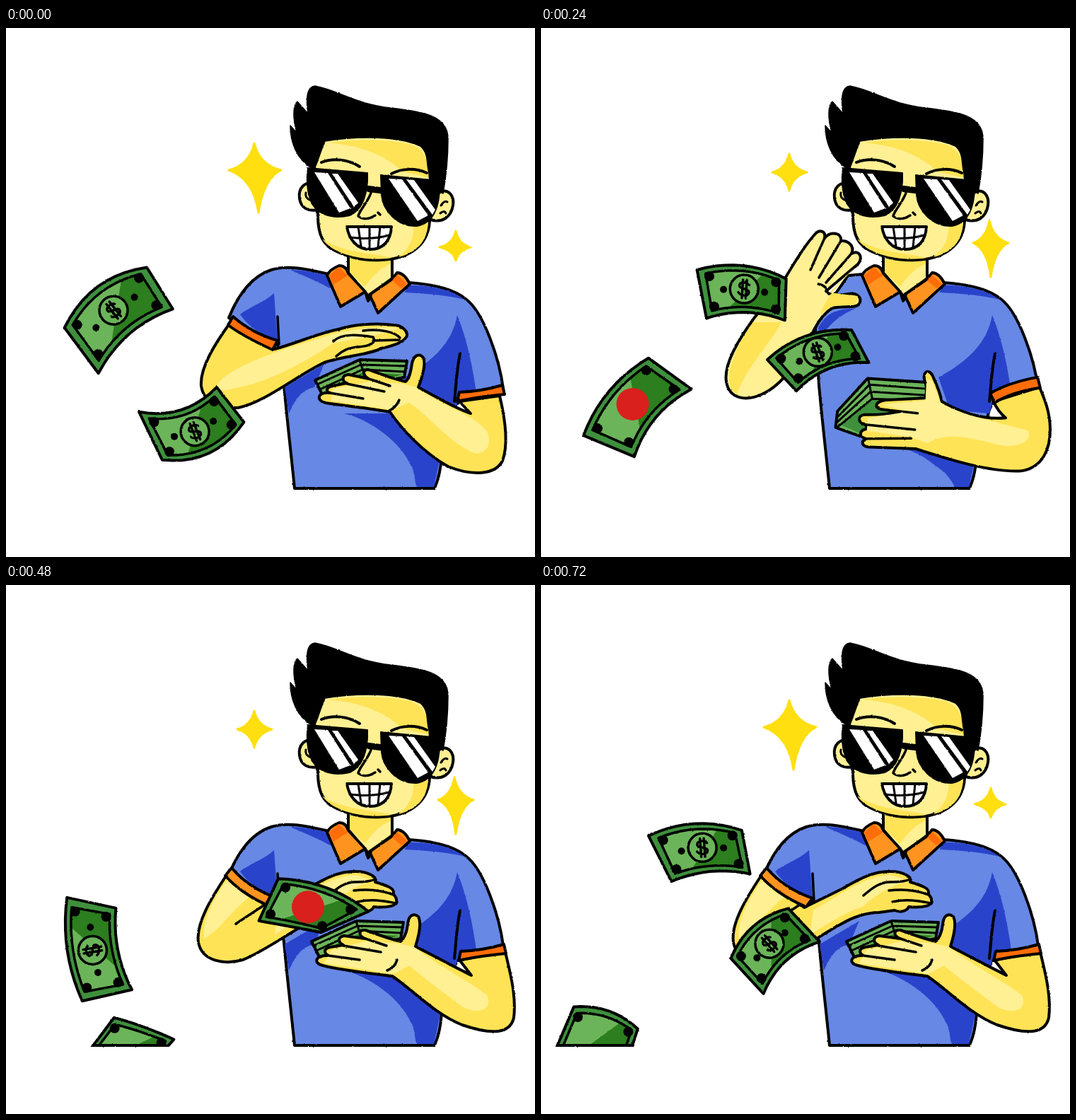
Write an HTML page that moves like this. It is 748x748 px and loops after 800 ms.

```html
<!DOCTYPE html>
<html lang="en">
<head>
<meta charset="utf-8">
<title>Raining money</title>
<style>
  html, body { margin: 0; width: 100%; height: 100%; overflow: hidden; background: #fff; }
  svg { display: block; width: 100vw; height: 100vh; }
  .art { stroke: #000; stroke-linecap: round; stroke-linejoin: round; }
  .pose { opacity: 0; animation: pose 400ms step-end infinite; animation-delay: calc(var(--i) * 80ms - 400ms); }
  .star { stroke: #ffdf10; stroke-width: 3; fill: #ffdf10; }
  .one { animation: twinkle 800ms step-end infinite; }
  .two { opacity: 0; animation: twinkle-off 800ms step-end infinite; }
  @keyframes pose { 0% { opacity: 1; } 20%, 100% { opacity: 0; } }
  @keyframes twinkle { 0%, 40%, 80%, 100% { opacity: 1; } 20%, 60% { opacity: 0; } }
  @keyframes twinkle-off { 0%, 40%, 80%, 100% { opacity: 0; } 20%, 60% { opacity: 1; } }
</style>
</head>
<body>
<svg viewBox="0 0 748 748" xmlns="http://www.w3.org/2000/svg">
  <defs>
    <filter id="ink" filterUnits="userSpaceOnUse" x="0" y="0" width="748" height="748" color-interpolation-filters="sRGB">
      <feTurbulence type="fractalNoise" baseFrequency=".3" numOctaves="2" seed="4"/>
      <feDisplacementMap in="SourceGraphic" scale="2" xChannelSelector="R" yChannelSelector="G"/>
    </filter>
    <clipPath id="floor"><rect width="748" height="653"/></clipPath>
  </defs>
  <g id="art" class="art" filter="url(#ink)"></g>
</svg>
<script>
const SKIN = '#fff093', TAN = '#fee356', BLUE = '#6788e4', NAVY = '#2944cb',
  ORANGE = '#ff931f', RUST = '#ff6d08', LEAF = '#6cb45a', GREEN = '#3f903d', MOSS = '#2c7e1e', RED = '#d9201c';

const ink = (d, fill = 'none', w = 4) => `<path d="${d}" fill="${fill}" stroke-width="${w}"/>`;
const tint = (d, fill) => `<path d="${d}" fill="${fill}" stroke="none"/>`;
const dot = (x, y, r, fill = '#000', w = 0) => `<circle cx="${x}" cy="${y}" r="${r}" fill="${fill}" stroke-width="${w}"/>`;
const group = (body, attrs = '') => `<g ${attrs}>${body}</g>`;

// Four-pointed star from its centre and the reach of each tip; lean shifts the lower tip.
function star(x, y, up, right, down, left, lean = 0) {
  const k = 0.2, foot = x + lean;
  return `<path class="star" d="M${x} ${y - up}Q${x + right * k} ${y - up * k} ${x + right} ${y}` +
    `Q${foot + right * k} ${y + down * k} ${foot} ${y + down}Q${foot - left * k} ${y + down * k} ${x - left} ${y}` +
    `Q${x - left * k} ${y - up * k} ${x} ${y - up}Z"/>`;
}

const mix = (a, b, t) => a.map((v, i) => v + (b[i] - v) * t);

// Straight edge a-b bowed sideways by bow pixels at its middle.
function edge(a, b, bow) {
  const dx = b[0] - a[0], dy = b[1] - a[1], len = Math.hypot(dx, dy);
  return t => {
    const k = bow * 4 * t * (1 - t) / len, q = mix(a, b, t);
    return [q[0] + dy * k, q[1] - dx * k];
  };
}

// Banknote through corners TL, TR, BR, BL; kind is 'cash', 'badge' or 'plain'.
function bill(tl, tr, br, bl, bowTop, bowBottom, kind = 'cash') {
  const top = edge(tl, tr, bowTop), bottom = edge(bl, br, bowBottom);
  const at = (u, v) => mix(top(u), bottom(u), v);
  const row = (u0, u1, v) => Array.from({ length: 11 }, (_, i) => at(u0 + (u1 - u0) * i / 10, v));
  const shape = (...rows) => 'M' + rows.flat().map(q => q.map(n => n.toFixed(1)).join(' ')).join('L') + 'Z';
  const frame = shape(row(.09, .91, .13), row(.91, .09, .87));
  let out = ink(shape(row(.01, .99, .02), row(.99, .01, .98)), GREEN) + tint(frame, LEAF) +
    tint(shape(row(.72, .91, .13), row(.91, .3, .87)), MOSS) + ink(frame, 'none', 3.5);
  for (const u of [.125, .875]) for (const v of [.2, .8]) out += dot(...at(u, v), 7);
  const mid = at(.5, .5);
  if (kind === 'badge') out += dot(...mid, 23, RED);
  if (kind === 'cash') {
    const a = at(.4, .5), b = at(.6, .5);
    const turn = Math.atan2(b[1] - a[1], b[0] - a[0]) * 180 / Math.PI;
    out += dot(...at(.26, .5), 5) + dot(...at(.74, .5), 5) + dot(...mid, 20, LEAF, 3.5) +
      group(ink('M7-6C3-11-8-10-7-4C-6 1 8-1 7 5C6 11-5 10-8 5M-2.500-13V13M3-13V13', 'none', 3.4),
        `transform="translate(${mid}) rotate(${turn})"`);
  }
  return out;
}
const ground = (x0, x1) => ink(`M${x0} 651H${x1}`);

const torso = left => ink(`M456 348${left}L393 505C398 560 404 610 408 651H606C612 637 615 622 616 605` +
  'L634 540L640 527L703 510C698 470 676 402 650 383C630 367 600 362 570 360L546 350L484 340Z', BLUE);
const sideShade = tint('M638 406C632 440 610 468 562 494L578 540L634 545L640 526L665 516C660 480 652 440 638 406Z', NAVY) +
  ink('M642 460C637 485 636 510 634 528') +
  tint('M566 364C600 363 630 370 648 384C625 378 600 376 564 374Z', NAVY);
const collar = ink('M484 322V346L512 379L546 354V325Z', SKIN) +
  tint('M486 326H544V333C525 342 515 355 508 366L486 345Z', TAN) +
  ink('M471 336C461 340 456 345 454 350L473 394L508 373L484 347C482 340 478 336 471 336Z', ORANGE) +
  tint('M470 338L457 350L463 363L483 350Z', RUST) +
  ink('M546 355L514 377L526 403L571 362C566 352 560 346 553 346Z', ORANGE) +
  tint('M553 349L546 357L559 368L567 362Z', RUST) + ink('M508 373L512 386L516 377');

const head =
  ink('M440 222C422 213 413 228 415 241C417 255 428 260 441 257Z', SKIN) +
  ink('M610 234C626 224 634 238 632 251C629 268 617 276 600 271Z', SKIN) +
  ink('M424 233Q422 240 431 244M615 251Q620 243 624 246M614 262Q620 257 622 262', 'none', 3) +
  ink('M436 195L441 256C440 286 445 302 460 312C485 326 510 329 530 328C565 327 597 311 599 273L612 225L590 150H450Z', SKIN) +
  tint('M455 162C500 156 545 158 570 164C594 170 596 190 600 212L560 203C548 190 515 166 455 162Z', TAN) +
  tint('M576 279L597 272C597 302 580 318 555 324C572 310 577 296 576 279ZM447 298C475 318 520 318 545 325C515 330 465 324 447 298Z', TAN) +
  ink('M434 199C410 186 402 160 402 138L411 148C405 125 406 109 412 104L427 121C424 100 425 83 437 82' +
    'C470 88 495 108 545 113C585 119 625 121 625 157C625 185 622 212 618 234L605 226C600 222 598 213 598 205' +
    'C594 190 598 178 586 167C555 153 500 152 451 160C446 172 443 182 438 195Z', '#000', 1.5) +
  ink('M446 190C462 183 485 186 500 196M545 206C560 198 580 198 595 205') +
  ink('M427 198L511 205C512 232 505 257 486 265C460 271 437 263 430 242C425 227 425 212 427 198Z', '#000', 2) +
  ink('M530 208L613 216C614 246 608 275 581 280C552 281 533 257 531 236Z', '#000', 2) + ink('M509 227L533 230', 'none', 9) +
  tint('M436 204L455 205L487 255L471 261ZM461 206L469 206L498 247L492 253Z' +
    'M541 213L560 214L597 265L582 273ZM566 214L577 215L607 257L603 264Z', '#fff') +
  ink('M516 233C512 246 500 257 498 266C504 271 513 271 522 265M526 261L529 264', 'none', 3.5) +
  ink('M482 281L545 281C544 300 534 313 515 313C496 313 485 299 482 281Z', '#fff') +
  ink('M486 296Q515 300 542 293M498 281L502 308M514 281V312M529 281L526 310', 'none', 3);

const sleeveDown = 'C430 342 400 334 375 342C345 352 327 380 315 410L384 448';
const sleeveShade = tint('M379 375C365 388 345 394 331 405C345 425 365 436 384 444Z', NAVY) + ink('M384 408L386 447', 'none', 3.5) +
  tint('M402 342C425 342 445 348 456 350L463 371C445 360 425 352 402 342Z', NAVY) +
  tint('M394 508L450 475L436 508C416 512 408 528 400 545Z', NAVY);
const lapShade = tint('M478 545C520 555 560 590 571 616C580 630 577 642 581 649H605L614 608L560 545Z', NAVY);
const chestShade = tint('M448 571C490 590 530 594 555 617C572 628 580 638 585 649H605L614 610L560 560Z', NAVY);

// Near arm in its four positions.
const restArm =
  ink('M316 418C296 446 274 480 276 506C280 532 305 538 328 537C365 530 410 492 450 473C480 463 515 462 530 453' +
    'C545 450 560 446 566 437C570 430 560 420 548 420C520 416 490 420 470 426C440 432 410 446 380 454Z', TAN) +
  tint('M298 507C305 485 375 458 440 440C475 426 530 420 555 425L524 434L462 446C420 475 370 500 330 508C315 511 303 516 298 507Z', SKIN) +
  ink('M463 443C475 431 500 434 519 437C525 446 512 450 498 451C484 452 476 456 467 464M505 428C530 425 550 430 557 438M519 442L556 441', 'none', 3.5) +
  ink('M321 408C340 425 360 435 384 442L377 455C355 445 330 432 314 420Z', RUST);
const bentArm =
  ink('M312 410C292 440 268 478 272 505C277 533 310 537 335 530C365 518 400 492 425 479C440 470 460 463 478 463L500 460' +
    'C510 464 518 460 520 455C540 457 556 453 552 446C553 440 546 439 548 434C548 428 535 424 522 420' +
    'C526 412 510 405 495 405C470 404 450 416 425 430L372 456Z', TAN) +
  tint('M312 418L345 440C315 465 300 490 280 500C276 475 295 442 312 418ZM385 460C420 440 460 410 495 410L519 418C495 425 470 440 455 455C430 462 405 480 380 494Z', SKIN) +
  ink('M456 439C470 427 480 420 494 420C507 420 516 419 522 416M492 432C515 429 535 433 548 438M497 448C520 443 540 448 552 450M325 479L366 452', 'none', 3.5) +
  ink('M319 400C335 419 358 434 384 443L375 455C345 443 322 425 310 411Z', ORANGE);
const tossArm =
  ink('M268 480C266 512 280 531 305 531C338 528 362 500 380 476C394 457 400 440 413 434C425 431 440 434 455 434' +
    'C470 434 473 424 466 418C458 412 446 416 438 413L494 374C502 362 494 352 484 358C490 344 475 338 466 347' +
    'C470 337 460 332 452 338L441 347C444 339 434 335 428 343L392 388L358 430Z', SKIN) +
  tint('M270 480L352 476C340 500 312 512 298 528C275 525 270 505 270 480ZM400 448C430 410 465 400 490 375L438 411L466 420L462 431L414 432Z', TAN) +
  ink('M441 347L413 386M466 347L430 390M484 358L450 396M410 388Q418 398 428 398', 'none', 3.5);
const wavedArm =
  ink('M300 412C280 440 258 475 262 500C266 525 290 528 312 518C342 505 365 470 387 425C395 410 405 400 412 396' +
    'C430 392 445 397 450 390C455 380 445 374 435 376C420 379 408 379 403 372L448 334C456 324 450 313 439 319' +
    'C444 308 434 300 424 301C426 290 410 286 401 297C403 287 394 284 387 292C375 305 358 332 345 354Z', SKIN) +
  tint('M300 416L340 416C325 445 290 480 277 518C255 505 268 460 300 416ZM395 405C405 375 425 360 444 338L408 374L448 379L445 391L412 393Z', TAN) +
  ink('M401 297L381 342M424 301L393 353M439 319L403 360M392 362Q404 364 405 374', 'none', 3.5);

// Far arm: palm up under the stack, or gripping it.
const flatStack =
  ink('M437 498L500 469L567 471L563 494L520 502L448 520Z', LEAF) +
  tint('M462 506L505 487L560 490L520 502Z', MOSS) +
  ink('M440 504L502 476L565 478M444 511L504 483L563 486M500 470L506 488', 'none', 3);
const farCuff = ink('M641 515C665 514 685 510 702 505L705 518C685 520 660 523 638 528Z', RUST);
const palmArm =
  ink('M641 528L657 545C635 538 605 520 583 508C588 495 594 475 590 466C584 459 576 463 574 475C572 488 570 496 565 500' +
    'C545 496 522 486 512 483C503 483 505 492 513 496L484 490C474 491 475 500 482 502L462 506C452 508 452 514 458 516' +
    'C440 514 438 527 452 530C475 534 520 538 543 543C560 568 590 600 625 620C660 634 692 632 702 612C712 585 704 545 698 520Z', TAN) +
  tint('M562 503L580 508C615 535 660 545 680 570C690 592 675 606 658 600C620 580 595 545 570 530L545 540L460 527L462 510L515 500Z', SKIN) +
  ink('M513 496L543 506M482 503L535 514M458 516L505 524M556 526Q552 536 542 541', 'none', 3.5) + farCuff;
const lowPalmArm =
  ink('M641 530L658 552C635 540 605 525 579 511C584 495 588 478 583 469C576 463 569 467 568 480C567 490 563 500 558 504' +
    'C540 500 520 492 508 488C498 487 498 496 508 500L478 496C468 498 470 506 477 509L459 512C448 514 450 521 456 524' +
    'C437 523 434 535 448 538C475 545 515 549 546 553C575 572 605 606 645 622C680 634 712 638 718 612C722 580 712 545 706 519Z', TAN) +
  tint('M556 507L577 512C610 538 655 560 680 580C690 602 665 608 645 596C610 570 590 555 570 538L548 550L450 535L460 516L512 503Z', SKIN) +
  ink('M508 500L538 510M477 510L530 519M456 524L500 530M553 530Q550 541 539 545', 'none', 3.5) +
  group(farCuff, 'transform="translate(2 3)"');
const gripArm =
  ink('M465 486L548 496L546 520L500 570L450 567L416 553L420 530Z', LEAF) +
  tint('M470 515L540 522L500 566L452 564L424 550Z', GREEN) +
  ink('M420 538L467 495L547 505M418 546L468 505L546 514M418 553L470 515L545 522M466 488L470 515', 'none', 3) +
  ink('M641 528C645 538 650 546 657 552C630 553 600 545 568 524C566 510 562 500 558 490C554 476 543 479 545 492' +
    'C548 502 549 512 544 518L490 518C474 518 470 529 484 531L508 536C490 538 470 538 458 537C447 538 448 548 458 551' +
    'L462 557C448 558 448 568 458 571C450 575 452 582 462 583L528 589C570 605 630 628 675 628C705 625 718 600 719 570C720 545 712 525 707 511Z', TAN) +
  tint('M548 492L556 494L566 526C600 548 650 558 688 572C694 592 660 596 640 588C600 575 570 568 545 582L520 572L460 560L462 542L520 536L482 524L545 521Z', SKIN) +
  ink('M484 531L533 539M458 551L528 562M458 571L522 574', 'none', 3.5) +
  ink('M637 516C655 507 680 500 705 497L708 512C685 514 660 520 642 530Z', RUST);

const restBody = torso(sleeveDown) + sleeveShade + lapShade + sideShade + collar;
const lowPalm = group(flatStack, 'transform="translate(-5 6)"') + lowPalmArm;
const poses = [
  [restBody + restArm,
    bill([81, 424], [200, 337], [238, 398], [131, 491], 20, 14) +
    bill([186, 541], [298, 506], [338, 557], [220, 612], -16, -20),
    flatStack + palmArm],
  [restBody + bentArm,
    bill([384, 414], [515, 462], [445, 492], [356, 476], 12, 0, 'badge') +
    bill([107, 590], [85, 440], [157, 456], [180, 573], 11, 9) +
    bill([153, 610], [239, 642], [196, 690], [100, 681], 2, 2, 'plain') + ground(123, 226),
    lowPalm],
  [torso('L430 345C395 322 360 325 344 349L390 400L388 470') +
    tint('M348 349C375 338 395 350 412 364L390 395Z', NAVY) + chestShade + sideShade + collar + tossArm,
    bill([207, 417], [360, 432], [358, 474], [222, 491], 20, 9, 'badge') +
    bill([259, 336], [397, 377], [362, 433], [258, 400], 15, 12) +
    bill([128, 621], [234, 655], [265, 720], [185, 682], 14, 8, 'plain') + ground(156, 232),
    gripArm],
  [torso('L434 350C415 380 395 400 388 425') +
    tint('M392 424C405 400 420 398 446 396C425 405 410 415 394 440Z', NAVY) + chestShade + sideShade + collar + wavedArm,
    bill([219, 341], [348, 354], [346, 415], [233, 412], 13, 10) +
    bill([318, 469], [440, 426], [465, 474], [361, 515], 14, 13) +
    bill([58, 577], [152, 465], [215, 511], [133, 608], 13, 13, 'badge'),
    group(gripArm, 'transform="translate(2 -3) rotate(-3 700 590)"')],
  [restBody + bentArm,
    bill([150, 354], [285, 346], [297, 410], [184, 421], 14, 9) +
    bill([267, 528], [350, 456], [396, 505], [315, 580], 14, 13) +
    bill([46, 595], [138, 627], [118, 690], [10, 680], 11, 8, 'plain') + ground(23, 130),
    lowPalm],
];

document.getElementById('art').innerHTML =
  group(star(351, 201, 38, 38, 60, 36, 6) + star(636, 310, 23, 21, 19, 23), 'class="one"') +
  group(star(351, 204, 26, 25, 26, 24) + star(634, 304, 32, 27, 48, 23, 2), 'class="two"') +
  poses.map(([body, bills, far], i) =>
    group(body + group(bills, 'clip-path="url(#floor)"') + far, `class="pose" style="--i:${i}"`)).join('') + head;
</script>
</body>
</html>
```
